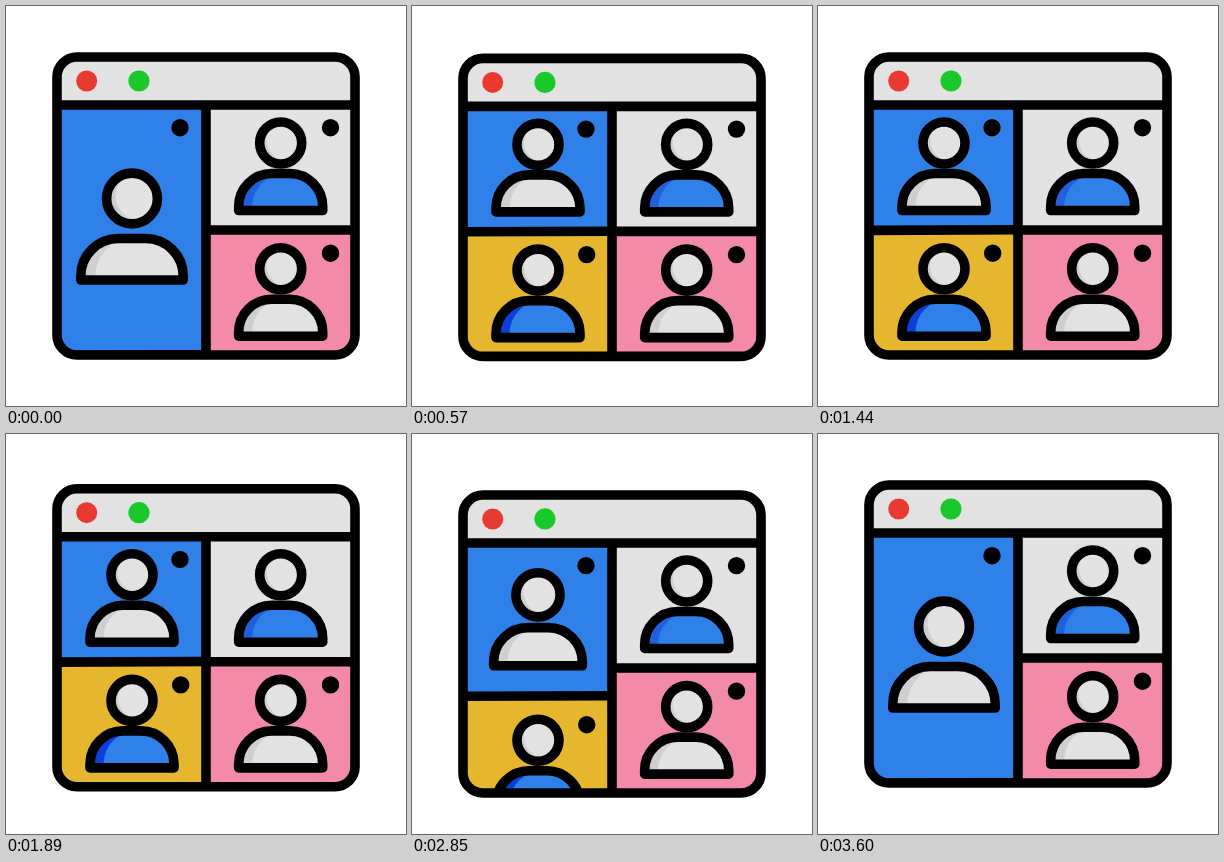
An HTML page with a canvas for the animation above (3.63 s loop, 400 by 400 pixels).

```html
<!DOCTYPE html>
<html lang="en">
<head>
<meta charset="utf-8">
<title>Video call window</title>
<style>
  html, body { margin: 0; width: 100%; height: 100%; overflow: hidden; background: #fff; }
  canvas { display: block; width: 400px; height: 400px; }
</style>
</head>
<body>
<canvas id="stage" width="400" height="400"></canvas>
<script>
const ctx = document.getElementById('stage').getContext('2d');
const LOOP = 3630, CLOSE = 2688;
const BLUE = '#2f80e8', GRAY = '#e2e2e2', SHADE = '#cfcfcf', PINK = '#f28aa8', YELLOW = '#e6b62f';

const ease = u => (1 - Math.cos(Math.PI * Math.min(1, Math.max(0, u)))) / 2;
const mix = (a, b, u) => a + (b - a) * u;

// Quick drop, slower return
const dip = t => 13 * ease(t / 240) * (1 - ease((t - 240) / 420));
const nudge = t => 3.7 * ease((t - 1620) / 270) * (1 - ease((t - 1890) / 270));

// 1 = single tall tile on the left, 0 = four tiles
const tall = (t, closeTime) => t < CLOSE ? 1 - ease(t / 440) : ease((t - CLOSE) / closeTime);

const dotHidden = t => t >= 1470 && t < 2520 && Math.floor((t - 1470) / 210) % 2 === 0;

function rect(x, y, w, h, color) {
  ctx.fillStyle = color;
  ctx.fillRect(x, y, w, h);
}

function disc(x, y, r, color = '#000') {
  ctx.fillStyle = color;
  ctx.beginPath();
  ctx.arc(x, y, r, 0, 2 * Math.PI);
  ctx.fill();
}

function line(x1, y1, x2, y2) {
  ctx.beginPath();
  ctx.moveTo(x1, y1);
  ctx.lineTo(x2, y2);
  ctx.stroke();
}

// Outlined shape with a shadow along its left side
function shaded(path, fill, shade, dx, dy) {
  ctx.save();
  ctx.clip(path);
  ctx.fillStyle = shade;
  ctx.fill(path);
  ctx.translate(dx, dy);
  ctx.fillStyle = fill;
  ctx.fill(path);
  ctx.restore();
  ctx.stroke(path);
}

// y is the head centre; size runs from 0 (small) to 1 (large)
function person(x, y, fill, shade, size = 0) {
  const top = y + mix(30.5, 40, size), bottom = y + mix(67.5, 81.5, size);
  const half = mix(42, 51.2, size), r = bottom - top - 4;
  const body = new Path2D();
  body.moveTo(x - half, bottom);
  body.arc(x - half + r, top + r, r, Math.PI, 1.5 * Math.PI);
  body.arc(x + half - r, top + r, r, 1.5 * Math.PI, 2 * Math.PI);
  body.lineTo(x + half, bottom);
  body.closePath();
  shaded(body, fill, shade, mix(13.5, 14.5, size), 0);

  const head = new Path2D();
  head.arc(x, y, mix(21, 25.4, size), 0, 2 * Math.PI);
  shaded(head, GRAY, SHADE, mix(7, 9, size), -3);
}

function draw(t) {
  const split = tall(t, 520), size = tall(t, 490);
  const drop = 125 * split, rise = 150 * split;
  const bob = dip(t) + nudge(t) + dip(t - CLOSE);

  rect(0, 0, 400, 400, '#fff');
  ctx.save();
  ctx.translate(0, bob);
  ctx.lineWidth = 9.6;
  ctx.lineJoin = 'round';
  const frame = new Path2D();
  frame.roundRect(51, 51, 298, 298, 20);

  ctx.save();
  ctx.clip(frame);
  rect(51, 51, 298, 48, GRAY);
  disc(80.7, 75, 10.5, '#e93a32');
  disc(133, 75, 10.6, '#19c92c');

  rect(51, 99, 149, 250, BLUE);
  person(126, mix(137, 192.5, size), GRAY, SHADE, size);
  disc(174, 121.7, 8.7);

  rect(51, 224 + drop, 149, 125, YELLOW);
  person(126, 262.7 + rise, BLUE, '#0b3fd8');
  disc(174.7, 247.2 + rise, 8.7);
  line(51, 224.4 + drop, 200, 223.8 + drop);

  rect(200, 99, 149, 125, GRAY);
  person(274.7, 137, BLUE, '#2060dc');
  if (!dotHidden(t)) disc(324.5, 121.7, 8.7);

  rect(200, 224, 149, 125, PINK);
  person(274.7, 262.7, GRAY, SHADE);
  disc(324.5, 247.2, 8.7);

  line(200, 224, 349, 224);
  line(51, 99, 349, 99);
  line(200, 99, 200, 349);
  ctx.restore();

  ctx.stroke(frame);
  ctx.restore();
}

const start = performance.now();
function tick() {
  draw((performance.now() - start) % LOOP);
  requestAnimationFrame(tick);
}
tick();
</script>
</body>
</html>
```
